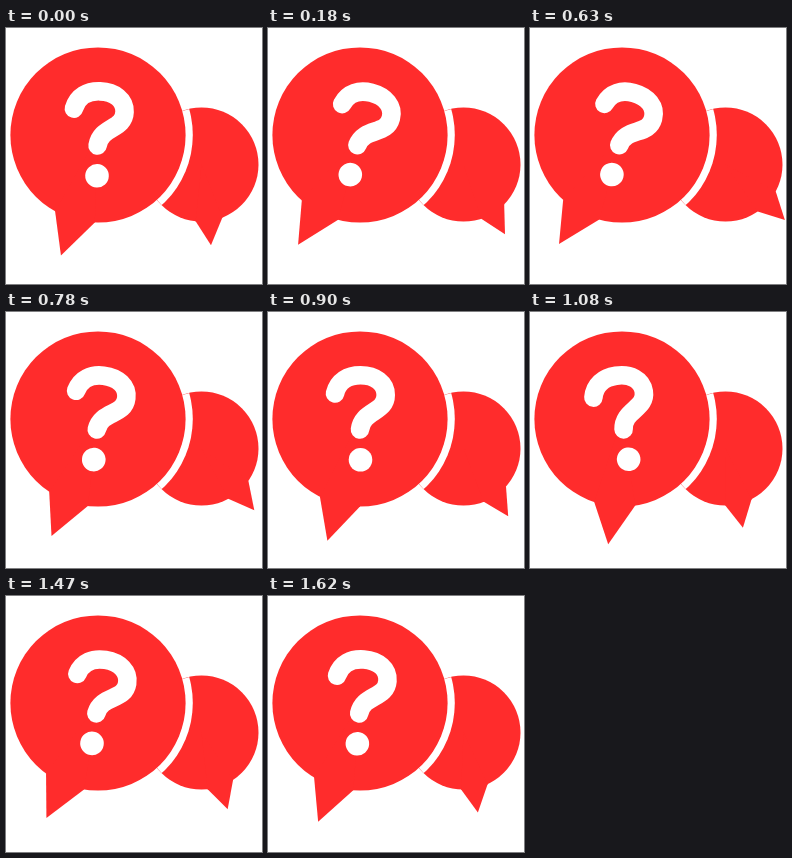
Write an HTML page with a canvas that moves like this. It is 256x256 px and loops after 1.65 s.

```html
<!DOCTYPE html>
<html lang="en">
<head>
<meta charset="utf-8">
<title>Question bubbles</title>
<style>
  html, body { margin: 0; width: 100%; height: 100%; overflow: hidden; background: #fff; }
  canvas { display: block; width: 100vw; height: 100vh; }
</style>
</head>
<body>
<canvas id="stage" width="256" height="256"></canvas>
<script>
const ctx = document.getElementById('stage').getContext('2d');
const RED = '#ff2c2c';
const LOOP = 1650, STEP = 30;
const RAD = Math.PI / 180;

const big = { x: 92, y: 107, r: 87.6, reach: 126 };
const small = { x: 195.5, y: 136.5, r: 57, reach: 81.2 };

// [time in ms, degrees]
const bigSwing = [[0, 2.1], [200, 15.5], [390, 21.6], [540, 18.9], [630, 15], [900, 0],
  [1080, -8.7], [1130, -9.2], [1320, 0], [1485, 9.5], [1620, 4.4], [1650, 2.1]];
const smallSwing = [[0, 6.7], [200, 33], [390, 49], [510, 51.2], [630, 47], [900, 33.4],
  [1080, 12.4], [1200, 3], [1320, 10.2], [1470, 18.8], [1620, 10.2], [1650, 6.7]];

// Smooth curve through the keys, with free ends
function swingAt(keys, t) {
  const slope = i => {
    const a = keys[Math.max(i - 1, 0)], b = keys[Math.min(i + 1, keys.length - 1)];
    return (b[1] - a[1]) / (b[0] - a[0]);
  };
  let i = 0;
  while (i < keys.length - 2 && t >= keys[i + 1][0]) i++;
  const [t0, v0] = keys[i], [t1, v1] = keys[i + 1];
  const span = t1 - t0, u = (t - t0) / span, w = 1 - u;
  return v0 * w * w * (1 + 2 * u) + v1 * u * u * (1 + 2 * w)
    + span * u * w * (slope(i) * w - slope(i + 1) * u);
}

function disc(x, y, r, color) {
  ctx.fillStyle = color;
  ctx.beginPath();
  ctx.arc(x, y, r, 0, 2 * Math.PI);
  ctx.fill();
}

// side is 1 when the tail leans left, -1 when it leans right
function drawTail({ x, y, r, reach }, angle, side) {
  const point = (offset, dist) => {
    const a = (angle + offset) * RAD;
    ctx.lineTo(x - side * dist * Math.sin(a), y + dist * Math.cos(a));
  };
  ctx.fillStyle = RED;
  ctx.beginPath();
  ctx.moveTo(x, y);
  point(12.2, r);
  point(0, reach);
  point(-15, r);
  ctx.fill();
}

function drawSmallTail(angle) {
  const { x, y, r, reach } = small;
  const point = (offset, dist) => {
    const a = (angle + offset) * RAD;
    ctx.lineTo(x + dist * Math.sin(a), y + dist * Math.cos(a));
  };
  ctx.fillStyle = RED;
  ctx.beginPath();
  ctx.moveTo(x, y);
  point(-12.6, r);
  point(0, reach);
  point(14.8, r);
  ctx.fill();
}

function drawGap() {
  ctx.save();
  ctx.beginPath();
  ctx.arc(small.x, small.y, small.r - 0.2, 0, 2 * Math.PI);
  ctx.clip();
  disc(big.x, big.y, 94.8, '#fff');
  ctx.restore();
}

function drawQuestion(angle) {
  ctx.save();
  ctx.translate(big.x, big.y);
  ctx.rotate(angle * RAD);
  ctx.translate(-big.x, -big.y);
  ctx.strokeStyle = '#fff';
  ctx.lineWidth = 18.6;
  ctx.lineCap = 'round';
  ctx.beginPath();
  ctx.moveTo(67, 81.5);
  ctx.bezierCurveTo(70, 69, 80, 63.3, 92.5, 63.3);
  ctx.bezierCurveTo(107, 63.3, 117.7, 71, 117.7, 83);
  ctx.bezierCurveTo(117.7, 101, 94.5, 98, 92, 117.5);
  ctx.stroke();
  disc(92.5, 147.8, 11.8, '#fff');
  ctx.restore();
}

function draw(t) {
  const bigAngle = swingAt(bigSwing, t);
  ctx.fillStyle = '#fff';
  ctx.fillRect(0, 0, 256, 256);
  disc(small.x, small.y, small.r, RED);
  drawGap();
  drawSmallTail(swingAt(smallSwing, t));
  disc(big.x, big.y, big.r, RED);
  drawTail(big, bigAngle + 15, 1);
  drawQuestion(bigAngle);
}

const start = performance.now();
function tick() {
  const t = (performance.now() - start) % LOOP;
  draw(Math.floor(t / STEP) * STEP);
  requestAnimationFrame(tick);
}
tick();
</script>
</body>
</html>
```
